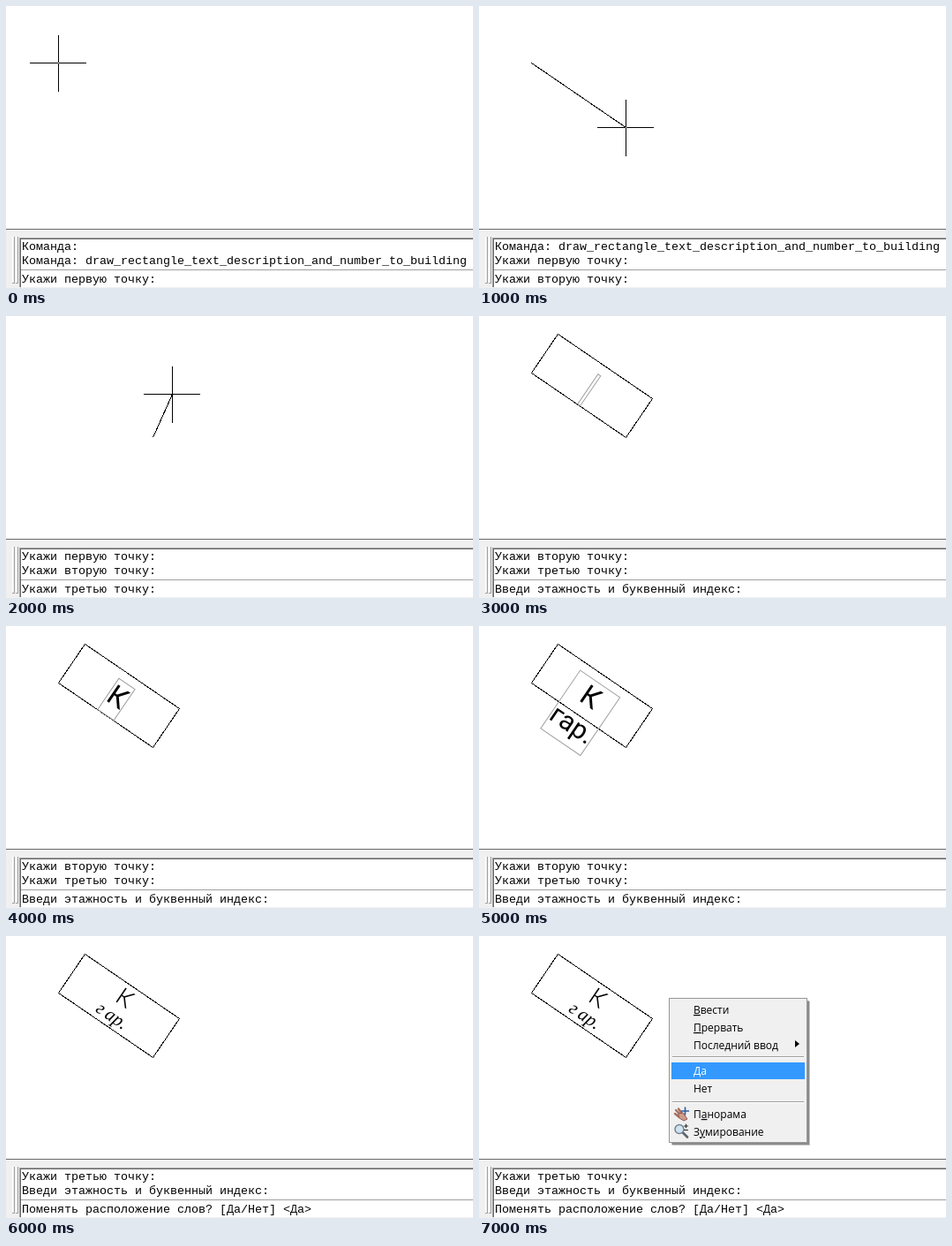
An HTML page that plays this animation: 529x319 px, repeating every 8000 ms.

```html
<!DOCTYPE html>
<html lang="ru">
<head>
<meta charset="utf-8">
<title>Построение здания</title>
<style>
  html, body { margin: 0; width: 100%; height: 100%; overflow: hidden; background: #fff; }
  svg { display: block; }
  .crisp { shape-rendering: crispEdges; }
  .line { fill: none; stroke: #000; }
  .frame { fill: none; stroke: #a0a0a0; }
  .console text { font: 13.33px "Liberation Mono", monospace; white-space: pre; }
  .cad { font-family: Roboto, sans-serif; text-anchor: middle; }
  .menu text { font: 12px "Open Sans", sans-serif; }
  .u { text-decoration: underline; }
</style>
</head>
<body>
<svg width="529" height="319" viewBox="0 0 529 319">
  <rect width="529" height="319" fill="#fff"/>

  <!-- drawing area; data-on lists the steps in which a group is visible -->
  <g class="crisp">
    <g id="cursor">
      <path class="line" d="M-32 .5H32M.5 -31V33"/>
      <rect width="1" height="1" fill="#fff"/>
    </g>
    <path class="line" data-on="1" d="M59.5 64.5L166.5 137.5"/>
    <path class="line" data-on="2" d="M166.5 137.5L188.5 88.5"/>
    <path class="line" data-on="34567" d="M59.5 64.5L89.5 20.5L196.5 93.5L166.5 137.5Z"/>
  </g>
  <g class="cad" transform="translate(113 100.5) rotate(34.3)">
    <rect class="frame" data-on="3" x="-1.5" y="-41" width="3.5" height="41"/>
    <rect class="frame" data-on="4" x="-11" y="-42.5" width="22" height="42.5"/>
    <rect class="frame" data-on="5" x="-27" y="-42.5" width="54.5" height="79.5"/>
    <text data-on="45" y="-13.5" font-size="32">К</text>
    <text data-on="5" y="23" font-size="30">гар.</text>
    <g data-on="67">
      <text x="1" y="-28" font-size="27" font-weight="300">К</text>
      <text y="-6" font-size="21" font-family="'Liberation Serif', serif" font-style="italic"><tspan>г</tspan><tspan dx="4">ар.</tspan></text>
    </g>
  </g>

  <!-- command line -->
  <g class="console">
    <g class="crisp">
      <rect y="252" width="529" height="67" fill="#f0f0f0"/>
      <path d="M0 252.5H529" stroke="#696969"/>
      <rect x="16" y="263" width="513" height="55" fill="#fff"/>
      <path d="M15.5 318V262.5H529" class="frame"/>
      <path d="M16.5 318V263.5H529" fill="none" stroke="#696969"/>
      <path d="M17 298.5H529" class="frame"/>
      <path d="M7.5 314V261M11.5 314V261" stroke="#fff"/>
      <path d="M7 313.5H9.5V261M11 313.5H13.5V261" class="frame"/>
    </g>
    <text x="18" y="276"></text>
    <text x="18" y="292"></text>
    <text x="18" y="313"></text>
  </g>

  <!-- context menu -->
  <g class="menu" data-on="7">
    <rect x="219" y="74" width="156" height="163" fill="#000" opacity=".22"/>
    <rect x="218" y="73" width="156" height="163" fill="#000" opacity=".3"/>
    <g class="crisp">
      <rect x="215.5" y="70.5" width="156" height="163" fill="#f0f0f0" stroke="#979797"/>
      <path d="M219 136.5H368M219 187.5H368" class="frame"/>
      <path d="M219 137.5H368M219 188.5H368" stroke="#fff"/>
      <rect x="218" y="143" width="151" height="19" fill="#39f"/>
    </g>
    <path d="M358 118L363 122L358 126Z"/>
    <text x="243" y="88"><tspan class="u">В</tspan>вести</text>
    <text x="243" y="108"><tspan class="u">П</tspan>рервать</text>
    <text x="243" y="128">Последний ввод</text>
    <text x="243" y="157" fill="#fff">Да</text>
    <text x="243" y="177">Нет</text>
    <text x="243" y="206">П<tspan class="u">а</tspan>норама</text>
    <text x="243" y="226">З<tspan class="u">у</tspan>мирование</text>
    <g stroke-linecap="round" fill="none">
      <path d="M223 197L228 202M226 195.500L230 201M222 201L227 205M231 201L233 206" stroke="#a86f62" stroke-width="2.4"/>
      <path d="M226 201L231 200L236 207L232 209L227 206Z" fill="#d19a8b" stroke="#8d5a50"/>
      <path d="M233.500 194V202M229.500 198H237.500" stroke="#2b5f9e" stroke-width="1.6"/>
      <path d="M231 222.500L236 227.500" stroke="#5b6570" stroke-width="2.6"/>
      <circle cx="227" cy="218.500" r="5" fill="#cfe3f3" stroke="#75838f" stroke-width="1.5"/>
      <path d="M234.500 213V217M232.500 215H236.500M232.500 219.500H236.500" stroke="#222"/>
    </g>
  </g>
</svg>
<script>
  const STEP = 1000, STEPS = 8;
  const log = [
    'Команда:',
    'Команда: draw_rectangle_text_description_and_number_to_building',
    'Укажи первую точку:',
    'Укажи вторую точку:',
    'Укажи третью точку:',
    'Введи этажность и буквенный индекс:',
    'Поменять расположение слов? [Да/Нет] <Да>'
  ];
  const scroll = [0, 1, 2, 3, 3, 3, 4, 4];
  const picks = [[59, 64], [166, 137], [188, 88]];

  const cursor = document.getElementById('cursor');
  const rows = document.querySelectorAll('.console text');
  const parts = document.querySelectorAll('[data-on]');
  const show = (el, on) => { el.style.display = on ? '' : 'none'; };

  function draw(step) {
    parts.forEach(el => show(el, el.dataset.on.includes(step)));
    rows.forEach((row, i) => { row.textContent = log[scroll[step] + i]; });
    show(cursor, step < picks.length);
    if (picks[step]) cursor.setAttribute('transform', `translate(${picks[step]})`);
  }

  const start = performance.now();
  let current = 0;
  function tick(now) {
    const step = Math.floor(Math.max(0, now - start) / STEP) % STEPS;
    if (step !== current) draw(current = step);
    requestAnimationFrame(tick);
  }
  draw(0);
  requestAnimationFrame(tick);
</script>
</body>
</html>
```
